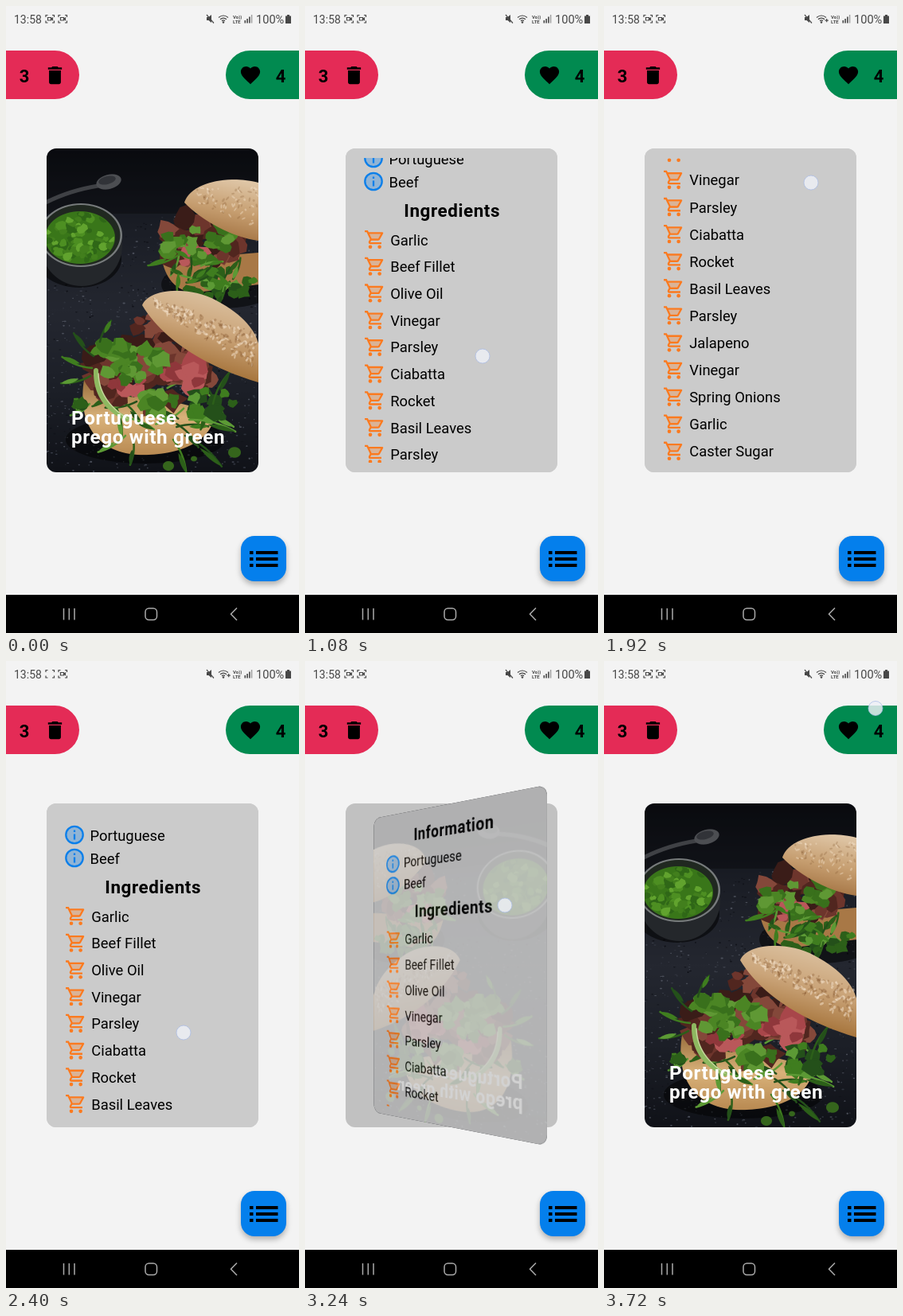
Animation of 368x788 px, one loop 3840 ms. Source, as an HTML page with a canvas:

```html
<!DOCTYPE html>
<html lang="en">
<head>
<meta charset="utf-8">
<title>Recipe card</title>
<style>
  html, body { margin: 0; width: 100%; height: 100%; overflow: hidden; background: #f3f3f3; }
  #stage { position: relative; width: 368px; height: 788px; overflow: hidden; font-family: Roboto, sans-serif; }
  #stage > svg { position: absolute; left: 0; top: 0; }
  .card { position: absolute; left: 51px; top: 179px; width: 266px; height: 407px; border-radius: 12px; overflow: hidden; }
  .card canvas, .card svg { position: absolute; left: 0; top: 0; width: 266px; height: 407px; }
  #info { background: #cbcbcb; }
  #title { position: absolute; left: 31px; top: 326.5px; color: #fff; font: 700 24.3px/24.5px Roboto, sans-serif; letter-spacing: .6px; white-space: nowrap; }
  .pill { position: absolute; top: 56px; height: 61px; width: 92px; }
  #fab { position: absolute; left: 295px; top: 666px; width: 57px; height: 57px; border-radius: 17px; background: #047fec; box-shadow: 0 4px 7px rgba(0,0,0,.28); }
  #nav { position: absolute; left: 0; top: 740px; width: 368px; height: 48px; background: #000; }
  text { font-family: Roboto, sans-serif; }
  .head { font-weight: 700; font-size: 22.4px; letter-spacing: .6px; text-anchor: middle; }
  .row { font-size: 18.4px; }
</style>
</head>
<body>
<div id="stage">
  <div class="pill" style="left:0;background:#e42b56;border-radius:0 31px 31px 0"></div>
  <div class="pill" style="left:276px;background:#018a50;border-radius:31px 0 0 31px"></div>
  <div class="card" id="base"></div>
  <div class="card" id="photo"><canvas width="532" height="814"></canvas><div id="title">Portuguese<br>prego with green</div></div>
  <div class="card" id="info"><svg viewBox="51 179 266 407">
    <clipPath id="clip"><rect x="51" y="191" width="266" height="383"/></clipPath>
    <g clip-path="url(#clip)"><g id="list"></g></g>
  </svg></div>
  <div id="fab"></div>
  <div id="nav"></div>
  <svg width="368" height="788" viewBox="0 0 368 788">
    <g fill="#484848">
      <text x="10" y="21.5" font-size="14">13:58</text>
      <text x="314" y="21.5" font-size="14.6">100%</text>
      <path d="M353 11h3v1.500h2v9.500h-7v-9.500h2z"/>
      <path d="M252 14h2.500l3.500-3v10l-3.500-3H252z"/>
      <g font-size="6" font-weight="700"><text x="285" y="15.500">Vo))</text><text x="285" y="22">LTE</text></g>
      <path d="M299.500 18h1.600v3.500h-1.600zM302.300 16h1.600v5.500h-1.600zM305.100 13.500h1.600v8h-1.600z"/>
      <path d="M307.900 11h1.400v10.500h-1.400z" opacity=".5"/>
      <circle cx="273" cy="20.500" r="1.300"/>
      <path id="traffic" d="M277.500 17.500h1.600v-1.500h1.200v1.500h1.500v1.200h-1.500v1.600h-1.200v-1.600h-1.600z"/>
    </g>
    <g fill="none" stroke="#484848" stroke-width="1.200">
      <path d="M252 11l9 10.500M267 14.500q6-5 12 0M269 16.800q4-3.500 8 0M271 18.800q2-1.700 4 0"/>
      <g id="scan"></g>
    </g>
    <text x="23" y="95.500" font-size="22" font-weight="700" text-anchor="middle">3</text>
    <text x="345" y="95.500" font-size="22" font-weight="700" text-anchor="middle">4</text>
    <path transform="translate(46.600 72.200) scale(1.24)" d="M6 19c0 1.100.9 2 2 2h8c1.100 0 2-.9 2-2V7H6zM19 4h-3.500l-1-1h-5l-1 1H5v2h14z"/>
    <path transform="translate(292.500 72.300) scale(1.21)" d="M12 21.350l-1.450-1.320C5.400 15.360 2 12.280 2 8.500 2 5.420 4.420 3 7.500 3c1.740 0 3.410.81 4.500 2.090C13.090 3.810 14.760 3 16.500 3 19.580 3 22 5.420 22 8.500c0 3.780-3.400 6.860-8.550 11.540z"/>
    <path d="M306 687h4.500M314 687h27.500M306 695h4.500M314 695h27.500M306 703h4.500M314 703h27.500" stroke="#000" stroke-width="4"/>
    <g fill="none" stroke="#aaa" stroke-width="1.500">
      <path d="M72.500 757v14.500M79.300 757v14.500M86 757v14.500M290 756.500l-7.500 7.700 7.500 7.700"/>
      <rect x="175" y="757" width="14.500" height="14.500" rx="4.500"/>
    </g>
    <circle id="dot" r="9" fill="#eef1f6" fill-opacity=".83" stroke="#a9bbe6" stroke-opacity=".75"/>
  </svg>
</div>
<script>
const $ = id => document.getElementById(id);
const LOOP = 3840, STEP = 120;
const clamp = (v, a, b) => Math.min(b, Math.max(a, v));

// Info list
const CART = 'M15.550 13c.75 0 1.410-.41 1.750-1.030l3.580-6.490A.996.996 0 0 0 20.010 4H5.210l-.94-2H1v2h2l3.600 7.590-1.350 2.440C4.520 15.370 5.480 17 7 17h12v-2H7l1.100-2zM6.160 6h12.150l-2.760 5H8.530z';
const cart = y => `<g transform="translate(73.900 ${y - 14.4}) scale(1.16)" fill="#fb7a1f">
  <path d="M6.160 6h12.150l-2.760 5H8.530z" opacity=".3"/><path fill-rule="evenodd" d="${CART}"/>
  <circle cx="7" cy="20" r="2"/><circle cx="17" cy="20" r="2"/></g>`;
const badge = y => `<circle cx="86" cy="${y - .5}" r="10.700" fill="#0a7fea" fill-opacity=".3" stroke="#0a7fea" stroke-width="2.300"/>
  <path d="M86 ${y - 1.500}v7M86 ${y - 6.500}v2.500" stroke="#0a7fea" stroke-width="2.300"/>`;
const head = (y, s) => `<text class="head" x="184.700" y="${y + 8}">${s}</text>`;
const row = (x, y, s) => `<text class="row" x="${x}" y="${y + 6.5}">${s}</text>`;
const foods = ['Garlic', 'Beef Fillet', 'Olive Oil', 'Vinegar', 'Parsley', 'Ciabatta', 'Rocket', 'Basil Leaves',
  'Parsley', 'Jalapeno', 'Vinegar', 'Spring Onions', 'Garlic', 'Caster Sugar'];
$('list').innerHTML = head(210, 'Information') + head(311, 'Ingredients')
  + [['Portuguese', 246], ['Beef', 275]].map(([s, y]) => badge(y) + row(105.5, y, s)).join('')
  + foods.map((s, i) => cart(348 + i * 33.72) + row(107.2, 348 + i * 33.72, s)).join('');

const frame = x => `<path d="M${x} 14v-2.500h2.500M${x + 8} 11.500h2.500v2.500M${x + 10.5} 18.500v2.500h-2.500M${x + 2.5} 21h-2.500v-2.500"/>`;
const lens = (x, id) => `<path id="${id}" d="M${x + 2.5} 14.500h4v3.500h-4zM${x + 6.5} 16.300l2-1.300v2.600z"/>`;
$('scan').innerHTML = frame(50) + frame(66) + lens(50, 'blink') + lens(66, 'steady');

// Dish picture, painted once
function paint() {
  const c = document.querySelector('canvas').getContext('2d');
  c.scale(2, 2);
  c.translate(-51, -179);
  let seed = 7;
  const rnd = () => (seed = (seed * 16807) % 2147483647) / 2147483647;
  const pick = a => a[Math.floor(rnd() * a.length)];
  const grad = (x0, y0, x1, y1, cols) => {
    const g = c.createLinearGradient(x0, y0, x1, y1);
    cols.forEach((k, i) => g.addColorStop(i / (cols.length - 1), k));
    return g;
  };
  const shape = (d, fill) => { c.fillStyle = fill; c.fill(new Path2D(d)); };
  const line = (d, col, w) => { c.strokeStyle = col; c.lineWidth = w; c.lineCap = 'round'; c.stroke(new Path2D(d)); };
  const oval = (x, y, rx, ry, fill, rot = 0) => {
    c.beginPath(); c.ellipse(x, y, rx, ry, rot, 0, 7); c.fillStyle = fill; c.fill();
  };
  const blob = (x, y, r, fill) => {
    c.beginPath();
    for (let i = 0; i < 9; i++) {
      const a = i * Math.PI * 2 / 9, q = r * (.6 + rnd() * .6);
      c.lineTo(x + Math.cos(a) * q * 1.15, y + Math.sin(a) * q);
    }
    c.fillStyle = fill; c.fill();
  };
  const scatter = (n, x, y, rx, ry, r, cols) => {
    for (let i = 0; i < n; i++) {
      const a = rnd() * 6.28, q = Math.sqrt(rnd());
      blob(x + Math.cos(a) * q * rx, y + Math.sin(a) * q * ry, r * (.6 + rnd() * .7), pick(cols));
    }
  };
  const leaf = (x, y, a, len) => {
    c.save(); c.translate(x, y); c.rotate(a);
    line(`M0 0Q${len / 2} ${-len / 7} ${len} 0`, pick(leafy), 2.5);
    shape(`M${len * .4} 0Q${len * .7} -6 ${len} 0Q${len * .7} 5 ${len * .4} 0`, pick(leafy));
    c.restore();
  };
  const leafy = ['#3f7d1f', '#2c5f19', '#5c9a35', '#24501a'];
  const pesto = ['#4b8524', '#39701c', '#5f9834'];
  const meat = ['#51261f', '#6d352c', '#3a1c18', '#84483a'];
  const pink = ['#a8464a', '#b9585a', '#8f373b'];

  c.fillStyle = grad(0, 179, 0, 586, ['#0d0f15', '#1b1e26', '#242730', '#1c1f27', '#101218']);
  c.fillRect(51, 179, 266, 407);
  for (let i = 0; i < 900; i++) {
    const y = 265 + rnd() * 321;
    oval(51 + rnd() * 266, y, .4 + rnd() * 1.3, .4 + rnd() * .7, pick(['#3a3e49', '#11131a', '#2e323c', '#4a4e59']));
  }
  c.fillStyle = 'rgba(0,0,0,.3)'; c.fillRect(51, 179, 266, 82);

  line('M46 249Q78 232 116 226', '#3f4145', 5);
  oval(129, 221, 16, 9, '#4c4e52', -.25);
  oval(127, 219, 11, 5, '#313338', -.25);

  oval(92, 318, 53, 36, 'rgba(0,0,0,.55)');
  oval(95, 301, 51, 51, '#24272b');
  oval(94, 288, 52, 40, '#777b7c');
  oval(94, 288, 49.5, 38, '#202820');
  oval(93, 291, 44, 33, '#397619');
  c.save(); c.beginPath(); c.ellipse(93, 291, 43, 32, 0, 0, 7); c.clip();
  scatter(70, 93, 291, 43, 32, 5, ['#4d8f22', '#2f6717', '#61a32e', '#427f1d']);
  c.restore();

  // Rear sandwich
  oval(270, 350, 75, 30, 'rgba(0,0,0,.5)');
  shape('M196 320Q205 360 240 360L317 350V310z', '#a87846');
  scatter(38, 245, 295, 56, 32, 12, meat);
  scatter(7, 240, 318, 18, 10, 9, pink);
  scatter(26, 262, 352, 54, 22, 8, leafy);
  scatter(20, 260, 300, 55, 24, 8, pesto);
  for (let i = 0; i < 14; i++) leaf(205 + rnd() * 90, 310 + rnd() * 60, rnd() * 6.28, 28);
  leaf(218, 312, 2.8, 42);
  scatter(8, 206, 300, 10, 16, 8, pesto);
  shape('M224 247C232 222 278 212 317 222V295C285 291 246 270 224 247z',
    grad(270, 215, 255, 292, ['#dfc6a6', '#c69e70', '#a1703f']));

  // Front sandwich
  oval(175, 545, 100, 30, 'rgba(0,0,0,.5)');
  shape('M98 470C90 520 110 560 165 564C220 566 262 545 262 510z', grad(0, 470, 0, 564, ['#9a6f3d', '#d9b27a', '#b98a52']));
  for (let i = 0; i < 22; i++) leaf(112 + rnd() * 150, 480 + rnd() * 55, rnd() * 6.28, 40);
  scatter(70, 184, 455, 78, 48, 15, meat);
  scatter(10, 222, 462, 24, 22, 13, pink);
  scatter(7, 150, 470, 20, 20, 9, pink);
  scatter(10, 178, 400, 22, 9, 9, meat);
  scatter(30, 160, 447, 40, 24, 9, pesto);
  scatter(10, 130, 430, 18, 9, 9, pesto);
  scatter(12, 190, 500, 22, 14, 9, pesto);
  scatter(18, 257, 500, 28, 22, 9, leafy);
  [[108, 455, 3.5, 40], [106, 465, 2.9, 38], [110, 440, 4, 38], [105, 500, 2.6, 28], [118, 422, 5.2, 30],
   [230, 520, .25, 60], [225, 540, .7, 60], [210, 545, 1.2, 45], [260, 500, 5.2, 45], [150, 540, 2.6, 40], [160, 545, 1.7, 32]]
    .forEach(p => leaf(...p));
  line('M113 458Q112 500 152 519', '#8eb860', 6);
  line('M116 462Q117 496 152 518', '#c4d79b', 1.5);
  scatter(5, 88, 500, 7, 10, 8, leafy);
  [[204, 578, 7], [287, 561, 8], [236, 569, 4]].forEach(([x, y, r]) => oval(x, y, r, r * .85, '#35651c'));
  shape('M171 376C180 354 232 352 264 370C300 389 313 409 317 424V473C280 462 206 434 171 376z',
    grad(255, 358, 232, 450, ['#dcc2a1', '#cba57a', '#a8773f']));
  for (let i = 0; i < 220; i++) {
    const u = rnd(), v = rnd();
    oval(185 + u * 130, 366 + u * 45 + v * (10 + u * 38), 1 + rnd() * 2.5, .8 + rnd(), pick(['rgba(245,228,205,.5)', 'rgba(128,84,44,.3)']), rnd() * 3);
  }
  for (let i = 0; i < 80; i++) {
    const u = rnd();
    oval(240 + u * 76, 228 + rnd() * (20 + u * 30), 1 + rnd() * 2, .8 + rnd() * .7, pick(['rgba(245,228,205,.4)', 'rgba(128,84,44,.25)']), rnd() * 3);
  }
}
paint();

// Motion tables: time first, then values
const turn = [[0, 180], [120, 165], [240, 120], [360, 65], [480, 25.5], [600, 6], [720, 0],
  [3000, 0], [3120, 9], [3240, 36], [3360, 85], [3480, 130], [3600, 165], [3720, 180]];
const finger = [[840, 222, 490], [1080, 223, 440], [1440, 236, 317], [1680, 252, 236], [1800, 258, 217],
  [1920, 260, 222], [2040, 254, 274], [2400, 223, 467], [2520, 221, 505], [2640, 220, 520]];
function at(table, t) {
  if (t <= table[0][0]) return table[0].slice(1);
  for (let i = 1; i < table.length; i++) {
    const a = table[i - 1], b = table[i];
    if (t <= b[0]) {
      const k = (t - a[0]) / (b[0] - a[0]);
      return a.slice(1).map((v, j) => v + (b[j + 1] - v) * k);
    }
  }
  return table[table.length - 1].slice(1);
}
const show = (el, on) => { el.style.visibility = on ? 'visible' : 'hidden'; };

function draw(t) {
  const [angle] = at(turn, t);
  const fade = clamp((angle - 28) / 57, 0, 1);
  const tilt = a => `perspective(760px) rotateY(${a}deg)`;
  const g = Math.round(203 * (1 - fade * .35));
  $('base').style.background = `rgb(${g},${g},${g})`;
  show($('base'), angle < 180);
  $('info').style.transform = tilt(-angle);
  $('info').style.opacity = 1 - fade;
  $('photo').style.transform = tilt(180 - angle);
  show($('photo'), fade > 0);

  // The list follows the finger and stretches past either end
  const [fx, fy] = at(finger, t);
  const drag = t >= 840 && t <= 2640;
  const pull = drag ? 494 - fy : 0;
  const scroll = clamp(pull, 0, 228);
  const k = 1 + Math.abs(pull - scroll) * .00025;
  const mid = pull < 0 ? 340 : 425;
  $('list').setAttribute('transform', `translate(0 ${mid}) scale(1 ${k}) translate(0 ${-mid - scroll})`);

  const tap = t >= 3120 && t < 3360, end = t >= 3720;
  const [x, y] = end ? [341, 59.5] : tap ? [251, 307] : [fx, fy];
  $('dot').setAttribute('cx', x);
  $('dot').setAttribute('cy', y);
  show($('dot'), drag || tap || end);

  show($('blink'), !((t >= 1200 && t < 1680) || (t >= 2160 && t < 2640)));
  show($('traffic'), t >= 1200 && t < 2640);
}

const start = performance.now();
function tick() {
  const t = (performance.now() - start) % LOOP;
  draw(Math.floor(t / STEP) * STEP);
  requestAnimationFrame(tick);
}
tick();
</script>
</body>
</html>
```
